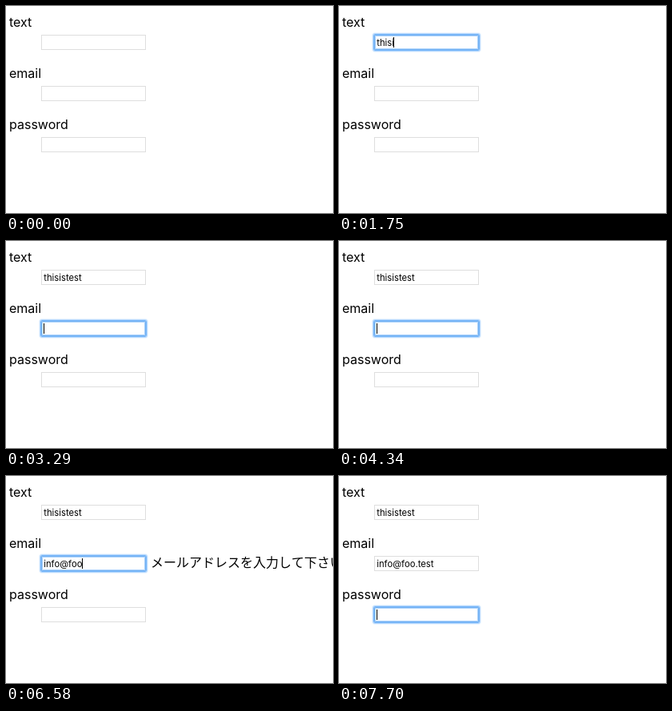
Animation of 409 by 259 pixels, one loop 8000 ms. Source, as an HTML page with a canvas:

```html
<!DOCTYPE html>
<html lang="ja">
<head>
<meta charset="utf-8">
<title>Form validation</title>
<style>
html, body { margin: 0; width: 100%; height: 100%; overflow: hidden; background: #fff; }
canvas { display: block; width: 409px; height: 259px; }
</style>
</head>
<body>
<canvas id="stage"></canvas>
<script>
const W = 409, H = 259, LOOP = 8000;
const BLINK = 1050, CARET_ON = 560;
const TEXT_FONT = '16px Inter, "Noto Sans CJK JP", "Noto Sans CJK", sans-serif';
const INPUT_FONT = '11.25px Inter, Roboto, sans-serif';
const INPUT_X = 47.25;

// Each note part is [text, x].
const fields = [
  {
    label: 'text', value: 'thisistest', focus: 280, blur: 3290,
    keys: [1120, 1330, 1400, 1540, 1750, 1960, 2380, 2520, 2800, 2870],
    valid: s => s.length >= 3 && s.length <= 15,
    note: [['名前は', 181], ['3~15', 229], ['文字を入力して下さい', 268]]
  },
  {
    label: 'email', value: 'info@foo.test', focus: 3290, blur: 7700,
    keys: [4550, 4620, 4900, 5040, 5670, 6230, 6300, 6580, 6650, 6860, 7070, 7210, 7350],
    valid: s => /^\w+@\w+\.\w{3,}$/.test(s),
    note: [['メールアドレスを入力して下さい', 181]]
  },
  {
    label: 'password', value: '', focus: 7700, blur: LOOP,
    keys: [], valid: () => true, note: []
  }
];

const canvas = document.getElementById('stage');
const ctx = canvas.getContext('2d');
const dpr = window.devicePixelRatio || 1;
canvas.width = W * dpr;
canvas.height = H * dpr;

function write(text, x, y, font) {
  ctx.font = font;
  ctx.fillStyle = '#000';
  ctx.fillText(text, x, y);
}

function drawBox(top, focused) {
  ctx.lineWidth = 1;
  ctx.strokeStyle = '#dedede';
  ctx.strokeRect(44.5, top + 0.5, 130, 18);
  if (!focused) return;
  // Soft focus ring, from one pixel inside the border outwards.
  [0.5, 0.75, 0.8, 0.42, 0.12].forEach((alpha, i) => {
    const d = i - 1;
    ctx.strokeStyle = `rgba(84, 164, 249, ${alpha})`;
    ctx.beginPath();
    ctx.roundRect(44.5 - d, top + 0.5 - d, 130 + 2 * d, 18 + 2 * d, Math.max(d, 0));
    ctx.stroke();
  });
}

function drawField(field, row, t) {
  const y = row * 64;
  const top = y + 36;
  const focused = t >= field.focus && t < field.blur;
  const pressed = field.keys.filter(k => k <= t);
  const typed = field.value.slice(0, pressed.length);

  write(field.label, 4, y + 26, TEXT_FONT);
  drawBox(top, focused);
  write(typed, INPUT_X, top + 14, INPUT_FONT);

  if (focused) {
    const last = pressed.length ? pressed[pressed.length - 1] : field.focus;
    if ((t - last) % BLINK < CARET_ON) {
      const x = Math.floor(INPUT_X + ctx.measureText(typed).width);
      ctx.fillRect(x, top + 3, 1, 13);
    }
  }
  if (typed && !field.valid(typed)) {
    for (const [text, x] of field.note) write(text, x, y + 50, TEXT_FONT);
  }
}

function draw(t) {
  ctx.setTransform(dpr, 0, 0, dpr, 0, 0);
  ctx.fillStyle = '#fff';
  ctx.fillRect(0, 0, W, H);
  fields.forEach((field, row) => drawField(field, row, t));
}

const start = performance.now();
function tick() {
  draw((performance.now() - start) % LOOP);
  requestAnimationFrame(tick);
}
tick();
</script>
</body>
</html>
```
